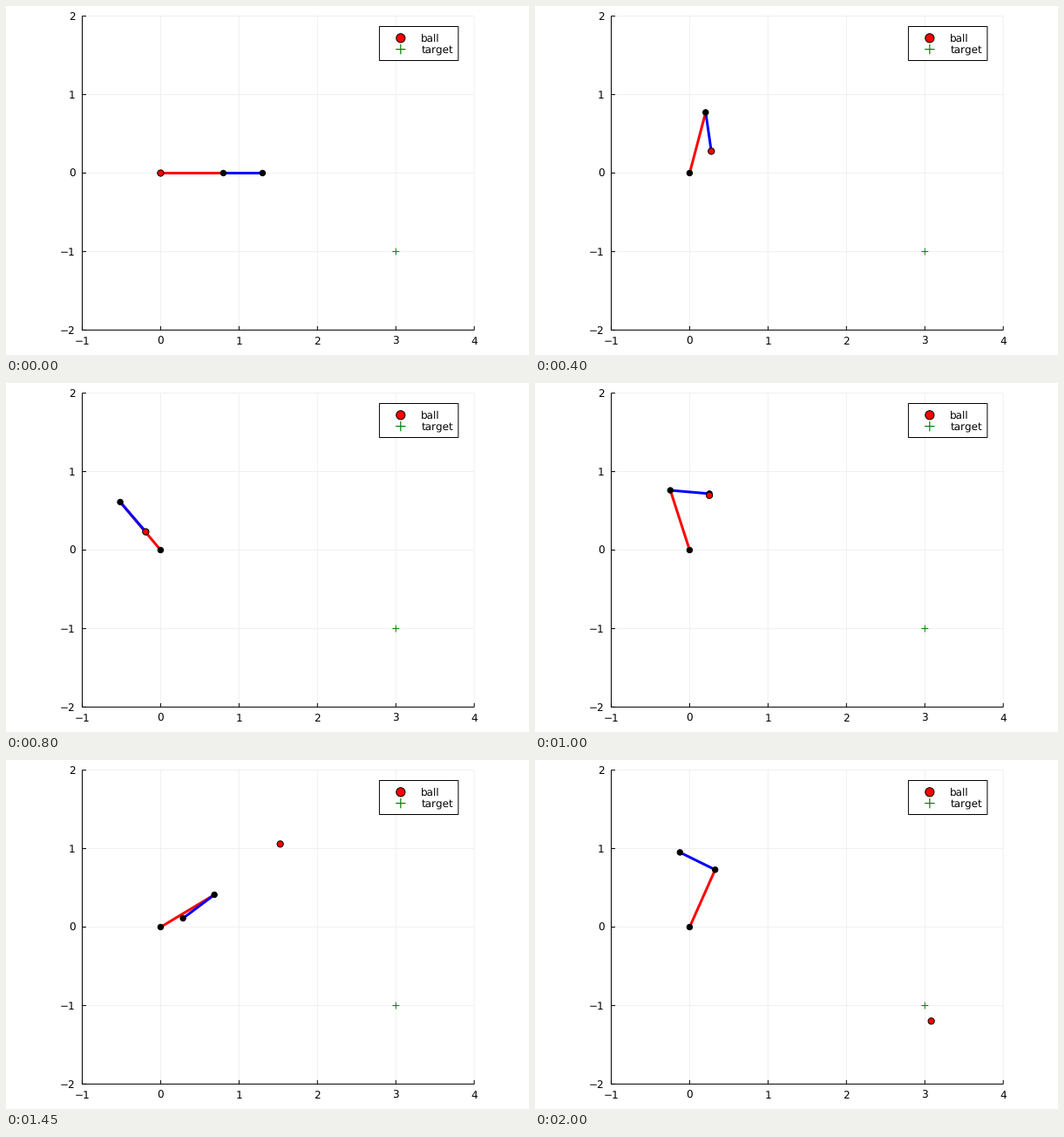
Recreate the animation shown at these times as a matplotlib script. Size 600x400 px, loop 2050 ms.

```python
import numpy as np
import matplotlib.pyplot as plt
from matplotlib.animation import FuncAnimation
from matplotlib.patches import Circle, Rectangle

W, H, DPI = 600, 400, 100
FRAMES, STEP = 41, 50
PT = 72 / DPI                       # points per pixel
OX, OY, UNIT = 177.4, 191.5, 89.95  # plot origin and scale in pixels
L1, L2, G = 0.8, 0.5, 9.81
RELEASE = 20

# Key poses of the throw: time step and link angles in degrees
KEYS = [(0, 0, 0), (8, 75.2, -81.7), (11, 111, -67), (16, 130.1, -49.3),
        (20, 107.9, -4.9), (25, 28.5, 138.3), (33, 54.3, 295.6),
        (37, 59, 408), (40, 66, 513.8)]
STEPS, UPPER, LOWER = np.array(KEYS, float).T


def px(x, y):
    return OX + UNIT * x, OY - UNIT * y


def ease(t, ts, vs):
    """Cubic Hermite curve through the key values, starting from rest."""
    slope = np.gradient(vs, ts)
    slope[0] = 0
    i = np.clip(np.searchsorted(ts, t, side="right") - 1, 0, len(ts) - 2)
    h = ts[i + 1] - ts[i]
    u = (t - ts[i]) / h
    blend = u * u * (3 - 2 * u)
    return (vs[i] + (vs[i + 1] - vs[i]) * blend
            + h * u * (1 - u) * (slope[i] * (1 - u) - slope[i + 1] * u))


def arm(i):
    a, b = (np.radians(ease(i, STEPS, v)) for v in (UPPER, LOWER))
    elbow = L1 * np.cos(a), L1 * np.sin(a)
    tip = elbow[0] + L2 * np.cos(b), elbow[1] + L2 * np.sin(b)
    return elbow, tip


def ball_at(i, tip):
    if i == 0:
        return 0, 0
    if i < RELEASE:
        return tip
    t = (i - RELEASE) * STEP / 1000
    return 0.252 + 2.83 * t, 0.697 + 3.01 * t - G * t * t / 2


plt.rcParams.update({"font.family": "DejaVu Sans", "font.size": 11.6 * PT,
                     "text.hinting": "none", "text.hinting_factor": 1})
fig = plt.figure(figsize=(W / DPI, H / DPI), dpi=DPI, facecolor="white")
ax = fig.add_axes([0, 0, 1, 1])
ax.set(xlim=(0, W), ylim=(H, 0))
ax.axis("off")


def line(xs, ys, color="black", width=1.0, z=1):
    return ax.plot(xs, ys, color=color, lw=width * PT, zorder=z, snap=False,
                   solid_capstyle="butt", solid_joinstyle="miter")[0]


def dot(center, radius, fill, z):
    """Circle with a 1 px black rim; radius is the outer one."""
    return ax.add_patch(Circle(center, radius - 0.5, fc=fill, ec="black",
                               lw=PT, zorder=z))


def plus(x, y, reach, width, z):
    line([x - reach, x + reach], [y, y], "green", width, z)
    line([x, x], [y - reach, y + reach], "green", width, z)


def label(x, y, text, ha):
    ax.text(x, y, text, ha=ha, va="baseline", zorder=9)


def number(n):
    return str(n).replace("-", "\u2212")


# Grid, axes and tick labels
left, bottom = px(-1, -2)
right, top = px(4, 2)
for n in range(-1, 5):
    x, _ = px(n, 0)
    line([x, x], [top, bottom], "#f0f0f0")
    line([x, x], [bottom, bottom - 4.5], z=2)
    label(x, 387.7, number(n), "center")
for n in range(-2, 3):
    _, y = px(0, n)
    line([left, right], [y, y], "#f0f0f0")
    line([left, left + 4.5], [y, y], z=2)
    label(79.6, y + 4.3, number(n), "right")
line([left, left, right], [top, bottom, bottom], z=2)

# Target and legend
plus(*px(3, -1), 4, 1, 3)
ax.add_patch(Rectangle((428.4, 23.5), 90.5, 39, fc="white", ec="black",
                       lw=PT, snap=False, zorder=7))
dot((452.8, 36.8), 5.6, "red", 8)
plus(452.8, 49.6, 5.7, 1.2, 8)
label(476.4, 41.2, "ball", "left")
label(476.8, 54, "target", "left")

upper = line([], [], "red", 3, 4)
lower = line([], [], "blue", 3, 5)
joints = [dot((0, 0), 3.7, "black", 6) for _ in range(3)]
ball = dot((0, 0), 4.1, "red", 6.5)


def draw(i):
    elbow, tip = arm(i)
    points = [px(0, 0), px(*elbow), px(*tip)]
    upper.set_data(*zip(*points[:2]))
    lower.set_data(*zip(*points[1:]))
    for joint, point in zip(joints, points):
        joint.center = point
    ball.center = px(*ball_at(i, tip))
    return upper, lower, *joints, ball


anim = FuncAnimation(fig, draw, frames=FRAMES, interval=STEP, repeat=True,
                     repeat_delay=0, init_func=lambda: draw(0), blit=False)
plt.show()
```
